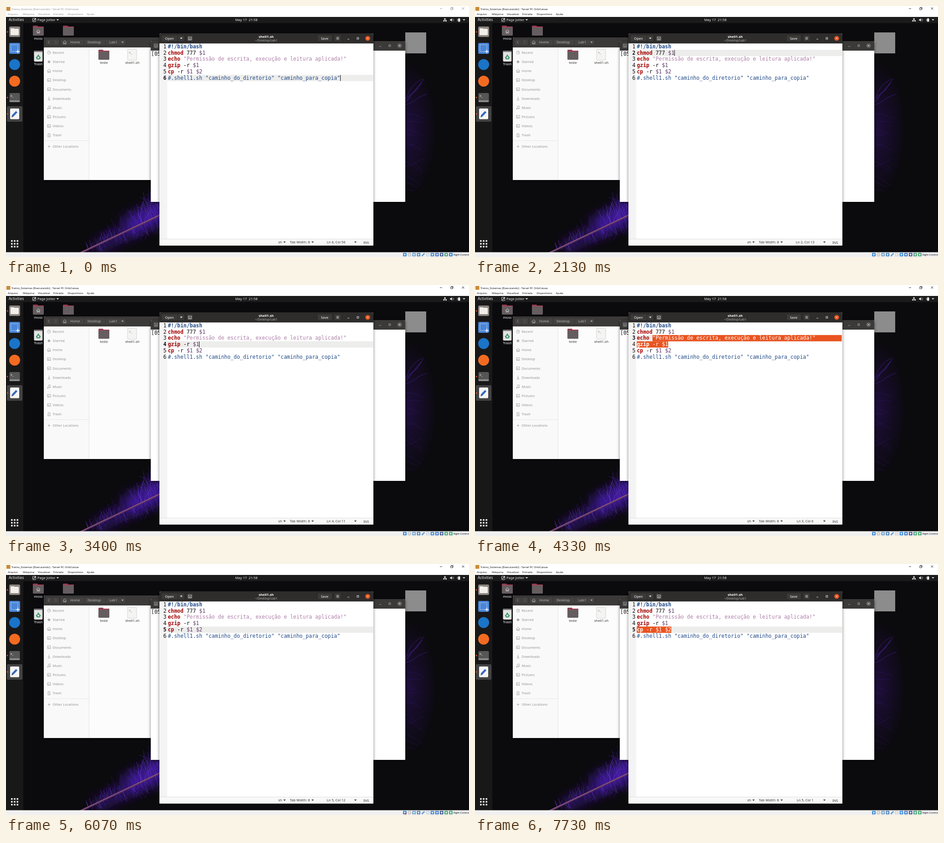
An HTML page for the animation above (8 s loop, 1017 by 551 pixels).

```html
<!DOCTYPE html>
<html lang="pt">
<head>
<meta charset="utf-8">
<style>
html,body{margin:0;width:100%;height:100%;overflow:hidden;background:#0b0a0d}
svg{display:block;width:100%;height:100%}
text{white-space:pre;font-family:"Noto Sans","Open Sans",sans-serif;font-size:7.6px}
.win{font-family:"Open Sans","Noto Sans",sans-serif;font-size:6.1px}
.mono text,text.mono{font-family:"DejaVu Sans Mono",monospace;font-size:11.45px}
.k{fill:#a40000;font-weight:bold}.s{fill:#ad7fa8}.v{fill:#5c3566}.c{fill:#204a87}
.b{font-weight:bold}
.inv tspan{fill:#fff}
</style>
</head>
<body>
<svg id="stage" viewBox="0 0 1017 551" preserveAspectRatio="none"></svg>
<script>
const LOOP = 8000;
const rect = (x, y, w, h, fill, more = '') =>
  `<rect x="${x}" y="${y}" width="${w}" height="${h}" fill="${fill}" ${more}/>`;
const circle = (x, y, r, fill, more = '') =>
  `<circle cx="${x}" cy="${y}" r="${r}" fill="${fill}" ${more}/>`;
const label = (x, y, s, fill, more = '') => `<text x="${x}" y="${y}" fill="${fill}" ${more}>${s}</text>`;
const line = (d, color, w = 0.8, more = '') =>
  `<path d="${d}" fill="none" stroke="${color}" stroke-width="${w}" ${more}/>`;
const tri = (x, y, fill) => `<path d="M${x - 2.7} ${y - 1.4}h5.4l-2.7 3z" fill="${fill}"/>`;
const mid = 'text-anchor="middle"';

let lcg = 11;
const rnd = () => {
  lcg = (Math.imul(lcg, 1664525) + 1013904223) >>> 0;
  return lcg / 4294967296;
};

// A curved purple filament with a few jittered joints
function bolt(x, y, angle, len, color, w, opacity) {
  let d = `M${x.toFixed(1)} ${y.toFixed(1)}`;
  for (let i = 0; i < 5; i++) {
    angle += (rnd() - 0.5) * 0.55;
    x += Math.cos(angle) * len / 5;
    y += Math.sin(angle) * len / 5;
    d += `L${x.toFixed(1)} ${y.toFixed(1)}`;
  }
  return line(d, color, w, `opacity="${opacity}" stroke-linejoin="round"`);
}

function wallpaper() {
  let s = rect(0, 24, 1017, 517, '#0b0a0d') +
    '<ellipse cx="885" cy="270" rx="62" ry="150" fill="url(#haze)"/>' +
    '<g filter="url(#soft)">' +
    line('M195 532L300 480L400 432', '#3c1690', 34, 'opacity=".5"') +
    line('M262 486L400 420', '#4a1cb4', 46, 'opacity=".6"') + '</g>';
  for (let i = 0; i < 210; i++) {
    const f = Math.pow(rnd(), 0.75), x = 172 + f * 180, y = 538 - f * 82;
    const up = rnd() < 0.68;
    const len = (up ? 12 + f * 58 : 8 + f * 34) * (0.35 + rnd() * 0.8);
    const tint = rnd() < 0.25 ? '#8a4dff' : '#5524c8';
    s += bolt(x, y, (up ? -1.75 : 1.2) + (rnd() - 0.5) * 0.6, len, tint, 0.6, 0.25 + rnd() * 0.5);
  }
  s += line('M162 543L345 456', '#5b3363', 4) + line('M162 542L345 455', '#93597f', 1.4);
  for (let i = 0; i < 5; i++)
    s += bolt(874, 218 - i * 3, -0.5 - i * 0.09, 50 + rnd() * 24, '#4c22a0', 0.9, 0.75);
  for (let i = 0; i < 12; i++)
    s += bolt(874, 235 + i * 15, (rnd() - 0.45) * 1.3, 16 + rnd() * 38, '#3d1a83', 0.7, 0.55);
  return s + rect(877, 58, 46, 46, '#8c8c8c');
}

const folder = (x, y) =>
  rect(x - 12, y - 11, 11, 6, '#8c3a4c', 'rx="1.5"') +
  rect(x - 12, y - 9, 24, 20, '#6d5c60', 'rx="2"') +
  rect(x - 12, y - 9, 24, 3, '#a04056', 'rx="1"') +
  rect(x - 12, y - 7, 24, 18, '#655d5f', 'rx="2"');
const house = (x, y, c) =>
  line(`M${x - 4} ${y}L${x} ${y - 4}L${x + 4} ${y}M${x - 2.8} ${y - 1}v4.5h2v-2.5h1.6v2.5h2v-4.5`, c, 0.9);

function desktop() {
  return folder(71, 54) + house(71, 56, '#ddd') + label(71, 73.5, 'moss', '#fff', mid) +
    folder(137, 54) + label(137, 73.5, 'tabelas', '#fff', mid) +
    rect(61.5, 98, 19, 24, '#e3e3e3', 'rx="2"') + rect(61.5, 98, 19, 3, '#777', 'rx="1"') +
    line('M68 113l3-5l3 5M75.5 112l-2 4h-5l-2-4', '#2f8f5b', 2) +
    label(71, 129.5, 'Trash', '#fff', mid);
}

function dock() {
  let s = rect(0, 37, 38, 504, '#191819') + rect(2, 220, 34, 34, '#434243', 'rx="2.5"');
  for (const y of [57, 201, 237]) s += circle(3.2, y, 1.4, '#e95420');
  s += rect(7, 45, 24, 23, '#8d8680', 'rx="3"') + rect(10, 50, 18, 14, '#f2efea', 'rx="1.5"') +
    rect(10, 49, 8, 4, '#f2efea', 'rx="1"') +
    rect(7, 81, 24, 24, '#4a86d8', 'rx="3"') +
    rect(11, 85, 15, 15, 'none', 'stroke="#e8f0fa" stroke-dasharray="2 1.5"') +
    line('M26 96v8M22 100h8', '#fff', 1.4) +
    circle(19, 128.5, 12, '#1a74c8') + circle(19, 165, 12, '#f36b21') +
    rect(7.5, 191, 23, 20, '#565656', 'rx="2.5"') + rect(7.5, 207, 23, 4, '#8a8a8a', 'rx="2"') +
    label(10, 199.5, '&gt;_', '#fff', 'style="font-size:6.5px;font-weight:bold"') +
    rect(9, 225, 20, 23.5, '#f4f4f4', 'rx="2"') +
    line('M14 242l9.5-10', '#3567c4', 4.5) + line('M12.6 244l2-2.2', '#333', 1.6);
  for (let i = 0; i < 9; i++)
    s += rect(11 + i % 3 * 6.2, 514 + Math.floor(i / 3) * 6.2, 3.6, 3.6, '#f2f2f2', 'rx=".7"');
  return s;
}

function topBar() {
  return rect(0, 24, 1017, 13.5, '#1c1b1c') + label(6, 33.4, 'Activities', '#f2f2f2', 'style="font-size:8px"') +
    rect(58.5, 27, 7, 7.4, 'none', 'stroke="#eee" stroke-width=".9" rx="1"') +
    line('M60.5 32.5l5-5.5', '#eee', 1.3) + label(69, 33.2, 'Page Jotter', '#f2f2f2') + tri(113.5, 30.4, '#eee') +
    label(528, 33.2, 'May 17  21:58', '#f2f2f2', mid) +
    rect(962.6, 27, 3, 2.6, '#eee') + rect(960.5, 31.4, 3, 2.6, '#eee') + rect(965, 31.4, 3, 2.6, '#eee') +
    line('M964 29.6v1.2M962 31.4v-.7h4.5v.7', '#eee', 0.7) +
    '<path d="M975.5 29h1.8l2.3-2v7l-2.3-2h-1.8z" fill="#eee"/>' +
    line('M981 28.5q1.6 2 0 4M982.6 27.5q2.4 3 0 6', '#bbb', 0.7) +
    rect(993, 27.5, 4.5, 7, '#eee', 'rx=".8"') + rect(994.4, 26.6, 1.7, 1, '#eee') +
    line('M991.5 28v5', '#eee', 0.7) + tri(1006, 30.4, '#eee');
}

const glyphs = {
  Recent: (x, y) => circle(x, y, 3.5, 'none', 'stroke="#9a9a9a" stroke-width=".8"') + line(`M${x} ${y - 2}v2h2`, '#9a9a9a'),
  Starred: (x, y) => `<path d="M${x} ${y - 4}l1.1 2.7h2.8l-2.2 1.8.9 2.9-2.6-1.7-2.6 1.7.9-2.9-2.2-1.8h2.8z" fill="#9a9a9a"/>`,
  Home: (x, y) => house(x, y, '#9a9a9a'),
  Downloads: (x, y) => line(`M${x} ${y - 4}v6M${x - 2} ${y}l2 2.2l2-2.2M${x - 3} ${y + 3.6}h6`, '#9a9a9a'),
  Music: (x, y) => line(`M${x - 1.5} ${y + 2.5}v-5.5l4-1v5.5`, '#9a9a9a') + circle(x - 2.5, y + 2.6, 1.2, '#9a9a9a') + circle(x + 1.6, y + 1.7, 1.2, '#9a9a9a'),
  Trash: (x, y) => line(`M${x - 3.5} ${y - 2.5}h7M${x - 1} ${y - 3.8}h2M${x - 2.7} ${y - 1}v4.8h5.4v-4.8M${x} ${y - 1}v4`, '#9a9a9a')
};
const sheet = (x, y) => rect(x - 3.4, y - 3, 6.8, 6, 'none', 'stroke="#9a9a9a" stroke-width=".8"') +
  line(`M${x - 2} ${y + 1.2}h4M${x - 1.8} ${y - 1}v2`, '#9a9a9a');

function filesWindow() {
  let s = rect(83, 69, 260, 313, '#fdfdfd', 'rx="3" filter="url(#drop)"') +
    rect(83, 72, 260, 310, '#fcfcfc') + rect(83, 91, 99, 291, '#f9f9f9') + rect(182, 91, 0.8, 291, '#dedede') +
    '<path d="M83 91V72q0-3 3-3H343V91z" fill="#3b3a39"/>' +
    rect(87, 72.5, 30, 14, '#434241', 'rx="2" stroke="#2d2c2b" stroke-width=".7"') +
    rect(119.5, 72.5, 144, 14, '#434241', 'rx="2" stroke="#2d2c2b" stroke-width=".7"') +
    line('M102 72.5v14M171.5 72.5v14M218.5 72.5v14', '#2d2c2b', 0.7) +
    line('M95 76.5l-2.5 3l2.5 3', '#a5a5a5') + line('M108 76.5l2.5 3l-2.5 3', '#6a6a6a') +
    house(129, 80, '#b5b5b5') + tri(256, 79.6, '#b5b5b5');
  [[141, 'Home'], [179, 'Desktop'], [227, 'Lab1']].forEach(([x, n]) => s += label(x, 82.2, n, '#b8b8b8'));
  ['Recent', 'Starred', 'Home', 'Desktop', 'Documents', 'Downloads', 'Music', 'Pictures', 'Videos', 'Trash']
    .forEach((n, i) => {
      const y = 102.3 + i * 20.13;
      s += (glyphs[n] || sheet)(94.5, y) + label(102.5, y + 2.7, n, '#929292');
    });
  return s + rect(83, 295, 99, 0.7, '#dfdfdf') + line('M91.5 308.5h6M94.5 305.5v6', '#9a9a9a') +
    label(102.5, 311.2, 'Other Locations', '#929292') +
    folder(215, 107) + label(215, 127, 'teste', '#333', mid) +
    rect(267, 95, 20, 24, '#f4f4f2', 'rx="2" stroke="#c9c9c7" stroke-width=".8"') +
    label(270, 105, '&gt;_', '#666', 'style="font-size:6.5px"') +
    label(277.5, 127, 'shell1.sh', '#333', mid);
}

const newTab = (x, y, c) => rect(x - 3.5, y - 3, 7, 6.3, 'none', `stroke="${c}" stroke-width=".8"`) +
  line(`M${x - 1.8} ${y + 0.8}h3.6M${x} ${y - 1}v3.6`, c);
const controls = (x, y, c, close) => line(`M${x - 2} ${y + 1.8}h4`, c, 0.9) +
  rect(x + 19, y - 1.8, 3.7, 3.7, 'none', `stroke="${c}" stroke-width=".9"`) +
  circle(x + 42.5, y, 5.3, close) + line(`M${x + 40.8} ${y - 1.7}l3.4 3.4m0-3.4l-3.4 3.4`, '#fff', 0.9);

function terminalWindow() {
  return rect(318, 77, 559, 353, '#fff', 'rx="3" filter="url(#drop)"') + rect(318, 90, 559, 340, '#fff') +
    '<path d="M318 98V80q0-3 3-3H874q3 0 3 3V98z" fill="#3b3a39"/>' +
    rect(322.5, 80, 14, 14, '#434241', 'rx="2" stroke="#2d2c2b" stroke-width=".7"') +
    newTab(329.5, 87, '#b5b5b5') + controls(822, 87, '#aaa', '#5c5b5a') +
    label(319, 108.8, '[05', '#111', 'class="mono"');
}

const COL = 6.893, LEFT = 355.4, ROW = 13.76, TOP = 82.3, EDGE = 806;
const colX = c => LEFT + (c - 1) * COL;
const rowY = n => TOP + (n - 1) * ROW;
const span = (cls, s) => `<tspan class="${cls}">${s}</tspan>`;
const code = [
  span('c b', '#!/bin/bash'),
  span('k', 'chmod') + ' 777 ' + span('v', '$1'),
  span('k', 'echo') + ' ' + span('s', '"Permissão de escrita, execução e leitura aplicada!"'),
  span('k', 'gzip') + ' -r ' + span('v', '$1'),
  span('k', 'cp') + ' -r ' + span('v', '$1') + ' ' + span('v', '$2'),
  span('c', '#.shell1.sh "caminho_do_diretorio" "caminho_para_copia"')
];
const codeText = fill => code.map((s, i) => label(LEFT, (rowY(i + 1) + 10.6).toFixed(2), s, fill)).join('');

function editorWindow() {
  return rect(337, 60, 470, 466, '#fff', 'rx="3.5" filter="url(#drop)"') + rect(337.3, 70, 469.4, 456, '#fff') +
    '<path d="M337 82.3V64q0-4 4-4H803q4 0 4 4V82.3z" fill="#2e2d2c"/>' +
    rect(341, 63.5, 51.5, 14.5, '#3a3938', 'rx="2" stroke="#222" stroke-width=".7"') + line('M377.5 63.5v14.5', '#222', 0.7) +
    rect(396.5, 63.5, 15, 14.5, '#3a3938', 'rx="2" stroke="#222" stroke-width=".7"') +
    rect(684, 63.5, 32.5, 14.5, '#3a3938', 'rx="2" stroke="#222" stroke-width=".7"') +
    rect(721, 63.5, 15, 14.5, '#3a3938', 'rx="2" stroke="#222" stroke-width=".7"') +
    label(359, 73.6, 'Open', '#fff', mid) + tri(385, 71, '#fff') + newTab(404, 71.2, '#eee') +
    label(571.5, 70, 'shell1.sh', '#fff', mid + ' class="b"') +
    label(571.5, 78.2, '~/Desktop/Lab1', '#b5b5b5', mid + ' style="font-size:6.6px"') +
    label(700, 73.6, 'Save', '#fff', mid) + line('M725.8 69h5.4M725.8 71h5.4M725.8 73h5.4', '#eee') +
    controls(752, 71, '#eee', '#e9541f') +
    rect(337.3, 82.3, 16.9, 429, '#f4f4f4') + rect(337.3, 511, 469.4, 15, '#f8f8f8') + rect(337.3, 511, 469.4, 0.7, '#d5d5d5') +
    label(598, 521.2, 'sh', '#333') + tri(611.8, 518.4, '#333') + label(623.5, 521.2, 'Tab Width: 8', '#333') +
    tri(673.5, 518.4, '#333') + tri(767.5, 518.4, '#333') + label(785, 521.6, 'INS', '#333') +
    '<rect id="row" x="354.2" width="452.4" height="13.76" fill="#ededeb"/>' +
    '<g class="mono">' +
    code.map((_, i) => label(352.5, (rowY(i + 1) + 10.6).toFixed(2), i + 1, '#111', 'text-anchor="end" data-num=""')).join('') +
    codeText('#000') + '</g><g fill="#e95420" class="sel"><rect/><rect/></g>' +
    `<g class="mono inv" clip-path="url(#picked)">${codeText('#fff')}</g>` +
    '<rect id="caret" width="1" height="13.4" fill="#000"/>' +
    '<path id="beam" d="M-.5 -2.5h1M-.5 2.5h1" stroke="#bbb" stroke-width=".8"/>' +
    '<text id="where" x="725" y="521.2" fill="#333" text-anchor="middle"></text>';
}

function hostFrame() {
  let s = rect(0, 0, 1017, 24, '#fff') + rect(1, 2, 8.5, 8.5, '#c98a35') +
    '<g class="host">' + label(12, 8.6, 'Treino_Sistemas [Executando] - Tarvel PC OrbiCaixas', 'inherit', 'class="win"');
  [[4, 'Arquivo'], [37, 'Máquina'], [70, 'Visualizar'], [104, 'Entrada'], [135.5, 'Dispositivos'], [177.5, 'Ajuda']]
    .forEach(([x, n]) => s += label(x, 20.2, n, 'inherit', 'class="win"'));
  s += '</g><g class="frame">' + line('M953 5.8h5M976.8 4.3h4v4h-4zM978 4.3v-1.2h4v4h-1.2M1001.5 3l5 5m0-5l-5 5', 'inherit', 0.8) + '</g>';
  s += rect(0, 540.5, 1017, 10.5, '#f0f0f0');
  const tints = ['#2f7fd0', '#d4d4d4', '#6f9fc8', '#4a80b8', '#62a0d8', '#d0d3d6', '#2f86d8', '#3a6fc0', '#40508c', '#3f9f6a', '#2277cc'];
  tints.forEach((c, i) => {
    const x = 876 + i * 10.1;
    if (i === 1) s += circle(x, 545.8, 3.7, c, 'stroke="#aaa" stroke-width=".6"') + circle(x, 545.8, 1, '#fff');
    else if (i === 4) s += line(`M${x - 3} 549l6-6`, c, 3);
    else s += rect(x - 3.8, 542, 7.6, 7.6, c, `rx="1" data-led="${i}"`) +
      rect(x - 1.9, 543.8, 3.8, 3, i === 5 ? '#eee' : '#d9ecfa') + rect(x - 1, 547.4, 2, 1, '#fff');
  });
  return s + '<rect id="disk" x="876" y="546" width="3.6" height="3.6" fill="#d84a3a"/>' +
    '<rect id="net" x="906.5" y="546" width="3.6" height="3.6" fill="#d84a3a"/>' +
    label(983, 548, 'Right Control', '#000', 'class="win" style="font-size:5.6px"');
}

const svg = document.getElementById('stage');
svg.innerHTML = `<defs>
  <radialGradient id="haze"><stop offset="0" stop-color="#26104e" stop-opacity=".7"/><stop offset="1" stop-color="#26104e" stop-opacity="0"/></radialGradient>
  <filter id="soft" x="-30%" y="-60%" width="160%" height="220%"><feGaussianBlur stdDeviation="11"/></filter>
  <filter id="drop" x="-10%" y="-10%" width="120%" height="120%"><feDropShadow dx="0" dy="1.5" stdDeviation="3" flood-opacity=".5"/></filter>
  <clipPath id="picked" class="sel"><rect/><rect/></clipPath></defs>` +
  wallpaper() + desktop() + dock() + topBar() + filesWindow() + terminalWindow() + editorWindow() + hostFrame();

const $ = q => svg.querySelector(q);
const row = $('#row'), caret = $('#caret'), beam = $('#beam'), where = $('#where');
const nums = svg.querySelectorAll('[data-num]'), picks = svg.querySelectorAll('.sel');
const show = (el, on) => el.setAttribute('visibility', on ? 'visible' : 'hidden');
const within = (t, a, b) => t >= a && t < b;
const ramp = (t, t0, t1, a, b) => a + (b - a) * Math.min(1, Math.max(0, (t - t0) / (t1 - t0)));
const drag = (...args) => Math.round(ramp(...args));

// Caret position and the point where the mouse button went down
function cursor(t) {
  if (t < 1800) return { ln: 6, col: 56, from: [6, 56] };
  if (t < 3270) return { ln: 2, col: drag(t, 2270, 2900, 13, 1), from: [2, 13] };
  if (t < 5600) {
    const col = t < 3930 ? drag(t, 3530, 3730, 11, 9)
      : t < 4740 ? drag(t, 3930, 4740, 9, 2) : drag(t, 4800, 4930, 2, 1);
    return { ln: within(t, 4200, 4530) ? 3 : 4, col, from: [4, 11] };
  }
  const col = t < 6130 ? 12 : drag(t, 6400, 7000, 11, 1);
  return { ln: 5, col, from: [5, 12] };
}

function place(el, x, y, w) {
  const box = { x, y, width: Math.max(0, w), height: ROW };
  for (const k in box) el.setAttribute(k, box[k]);
}

function draw(t) {
  const { ln, col, from: [endLn, endCol] } = cursor(t);
  const two = ln < endLn, empty = !two && col === endCol;
  row.setAttribute('y', rowY(ln));
  nums.forEach((n, i) => n.setAttribute('font-weight', i + 1 === ln ? 'bold' : 'normal'));
  for (const g of picks) {
    const [a, b] = g.children;
    place(a, colX(col), rowY(ln), (two ? EDGE - 0.5 : colX(endCol)) - colX(col));
    place(b, LEFT, rowY(endLn), two ? colX(endCol) - LEFT : 0);
  }
  show(caret, empty && !within(t, 6060, 6130));
  caret.setAttribute('x', colX(col) - 0.4);
  caret.setAttribute('y', rowY(ln) + 0.2);
  show(beam, within(t, 5200, 5560));
  beam.setAttribute('transform', `translate(${ramp(t, 5200, 5400, 440, 467.5)} ${ramp(t, 5200, 5400, 138, 145)})`);
  where.textContent = `Ln ${ln}, Col ${col}`;

  const active = t >= 1800;
  $('.host').setAttribute('fill', active ? '#000' : '#8a8a8a');
  $('.frame path').setAttribute('stroke', active ? '#111' : '#8a8a8a');
  $('[data-led="10"]').setAttribute('fill', active ? '#3aa564' : '#2277cc');
  show($('#disk'), within(t, 70, 270) || within(t, 6070, 6200));
  show($('#net'), within(t, 4800, 4930) || within(t, 5380, 5470));
}

const start = performance.now();
function tick() {
  draw((performance.now() - start) % LOOP);
  requestAnimationFrame(tick);
}
draw(0);
requestAnimationFrame(tick);
</script>
</body>
</html>
```
